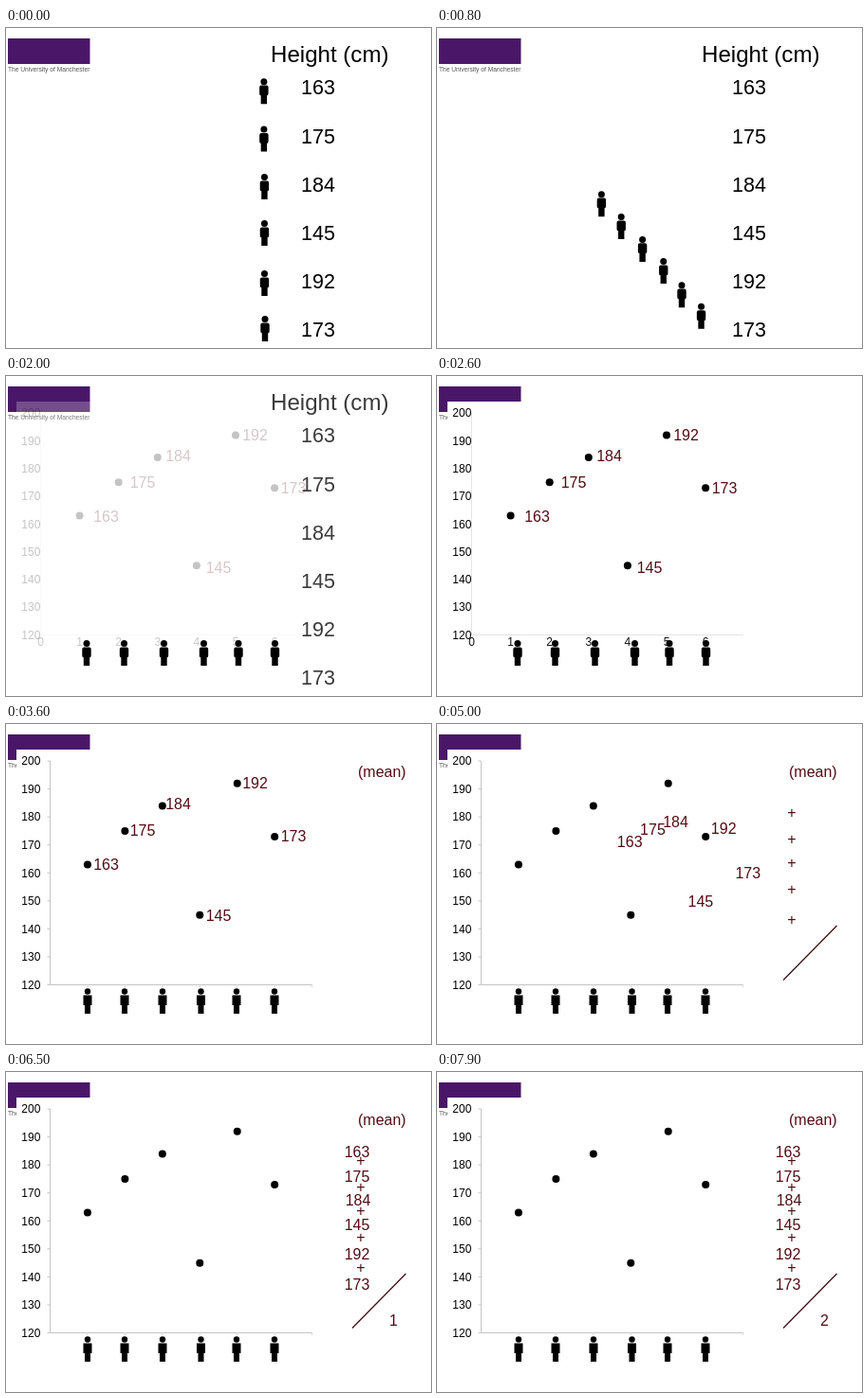
These frames come from a looping animation (448 px wide and 338 px high, 8 s). An HTML page with a canvas:

```html
<!DOCTYPE html>
<html>
<head>
<meta charset="utf-8">
<title>Mean height</title>
<style>
  html, body { margin: 0; width: 448px; height: 338px; overflow: hidden; background: #fff; }
  canvas { display: block; }
</style>
</head>
<body>
<canvas id="stage" width="448" height="338"></canvas>
<script>
const ctx = document.getElementById('stage').getContext('2d');
const LOOP = 8000, MOVE = 1590;
const RED = '#530c13';
const heights = [163, 175, 184, 145, 192, 173];

// Each path is [startX, startY, endX, endY]
const walkers = [
  [272, 53, 85, 279], [272, 103.5, 124.5, 279], [272.5, 154, 166.5, 279],
  [272.5, 203, 208.5, 279], [272.5, 256, 245, 279], [273, 304, 283.5, 279]
];
const labels = [
  [105.5, 148, 370, 84], [144, 112, 370, 110], [181.5, 84, 371, 135],
  [224, 202, 370, 161], [262.5, 62.5, 370, 192], [303, 118, 370, 224]
];
const figures = [86, 125, 165, 205.5, 243, 283];
const plusY = [94, 122, 147, 175, 207];
const blinks = [5800, 6700, 7700];

const ramp = (t, start, span) => Math.min(1, Math.max(0, (t - start) / span));
const ease = u => u * u * (3 - 2 * u);
const mix = (a, b, p) => a + (b - a) * p;

function text(s, x, y, size, color, align = 'center') {
  ctx.font = size + 'px "Liberation Sans", Arial, sans-serif';
  ctx.fillStyle = color;
  ctx.textAlign = align;
  ctx.fillText(s, x, y + size * 0.355); // y is the middle of the digits
}

function line(x1, y1, x2, y2, color, width = 1) {
  ctx.strokeStyle = color;
  ctx.lineWidth = width;
  ctx.beginPath();
  ctx.moveTo(x1, y1);
  ctx.lineTo(x2, y2);
  ctx.stroke();
}

function dot(x, y, r) {
  ctx.fillStyle = '#000';
  ctx.beginPath();
  ctx.arc(x, y, r, 0, 7);
  ctx.fill();
}

function faded(alpha, draw) {
  if (alpha <= 0) return;
  ctx.globalAlpha = alpha;
  draw();
  ctx.globalAlpha = 1;
}

function walker(x, y) {
  dot(x, y + 3.5, 3.5);
  ctx.beginPath();
  ctx.roundRect(x - 4.7, y + 7.4, 9.4, 11, 2);
  ctx.rect(x - 3.2, y + 16, 6.4, 11);
  ctx.fill();
}

function figure(x) {
  dot(x, 282.5, 3.2);
  ctx.fillRect(x - 4.5, 286.5, 9, 10.5);
  ctx.fillRect(x - 3, 296, 6, 10);
}

function chart(left, right, bottom, unit, step, axis) {
  ctx.fillStyle = '#fff';
  ctx.fillRect(11, 27, 319, 285);
  line(left, 39, left, bottom, axis);
  line(left, bottom, right, bottom, axis);
  for (let v = 120; v <= 200; v += 10) {
    const y = bottom - (v - 120) * unit;
    line(left - 3, y, left, y, axis);
    text(v, 36.3, y, 12, '#000', 'right');
  }
  heights.forEach((v, i) => dot(left + step * (i + 1), bottom - (v - 120) * unit, 4));
}

function indexChart() {
  chart(36.5, 323, 273.5, 2.93, 41.1, '#e4e4e4');
  for (let i = 0; i <= 6; i++) text(i, 36.5 + 41.1 * i, 280.5, 12, '#111');
}

function figureChart(t) {
  chart(46.5, 323, 275.5, 2.955, 39.45, '#c4c4c4');
  for (let i = 1; i <= 7; i++) line(46.5 + 39.45 * i, 275, 46.5 + 39.45 * i, 278, '#d8d8d8');
  figures.forEach((x, i) => {
    const hidden = t >= blinks[i] && t < blinks[i] + 200;
    if (!hidden) figure(x);
  });
}

function draw(t) {
  ctx.fillStyle = '#fff';
  ctx.fillRect(0, 0, 448, 338);
  ctx.fillStyle = '#4a1768';
  ctx.fillRect(2, 11, 86.5, 27);
  text('The University of Manchester', 2, 43.6, 6.65, '#555', 'left');

  const shown = ramp(t, 1880, 520);
  faded(shown, indexChart);
  faded(1 - shown, () => {
    text('Height (cm)', 279, 27.5, 24.1, '#000', 'left');
    heights.forEach((v, i) => text(v, 329, 62.8 + 51.1 * i, 21.5, '#000'));
  });

  const walk = ease(ramp(t, -24, MOVE));
  for (const [x1, y1, x2, y2] of walkers) walker(mix(x1, x2, walk), mix(y1, y2, walk));

  faded(ramp(t, 2800, 500), () => figureChart(t));

  const fly = ease(ramp(t, 4345, MOVE));
  faded(shown, () => labels.forEach(([x1, y1, x2, y2], i) =>
    text(heights[i], mix(x1, x2, fly), mix(y1, y2, fly), 16, RED)));

  faded(ramp(t, 3100, 500), () => text('(mean)', 371, 50.5, 16, RED, 'left'));
  faded(ramp(t, 3800, 500), () => {
    for (const y of plusY) text('+', 374, y - 0.2, 16, RED);
    line(365, 270.5, 421.5, 213, '#3b0a10', 1.2);
  });

  // Divisor counts up
  const one = ramp(t, 6100, 300), two = ramp(t, 7100, 300);
  faded(one * (1 - two), () => text('1', 408.5, 262, 16, RED));
  faded(two, () => text('2', 408.5, 262, 16, RED));
}

const start = performance.now();
function tick() {
  const t = (performance.now() - start) % LOOP;
  draw(Math.floor(t / 100) * 100);
  requestAnimationFrame(tick);
}
tick();
</script>
</body>
</html>
```
